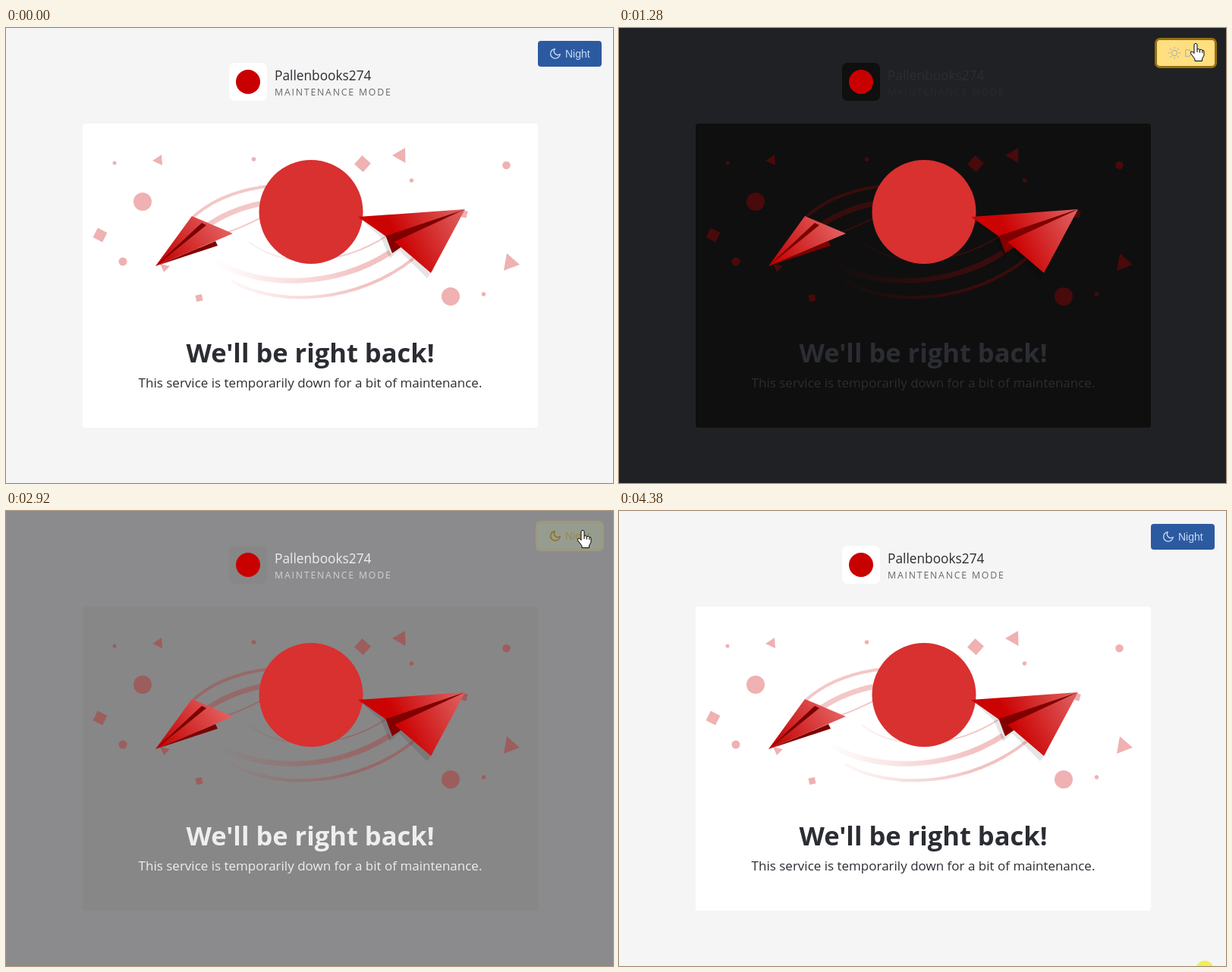
Recreate the animation shown at these times as an HTML page. Size 800x600 px, loop 4460 ms.

```html
<!DOCTYPE html>
<html lang="en">
<head>
<meta charset="utf-8">
<title>Maintenance mode</title>
<style>
html, body { margin: 0; width: 100%; height: 100%; overflow: hidden; background: var(--page); }
svg { display: block; width: 800px; height: 600px; }
text { font-family: "Open Sans", "Noto Sans", sans-serif; fill: var(--ink); }
.page { fill: var(--page); }
.card { fill: var(--card); }
.mid { text-anchor: middle; }
#bits { fill: #c00; opacity: .3; }
#trails { fill: none; stroke: #c00; }
#button text { font: 14px "Liberation Sans", Arial, sans-serif; fill: var(--label); }
#icons { fill: none; stroke: var(--icon); }
#cursor path { fill: #fff; stroke: #000; stroke-linejoin: round; }
</style>
</head>
<body>
<svg viewBox="0 0 800 600">
  <defs>
    <linearGradient id="wake" gradientUnits="userSpaceOnUse" x1="275" y1="0" x2="470" y2="0">
      <stop stop-color="#c00" stop-opacity="0"/><stop offset="1" stop-color="#c00" stop-opacity=".24"/>
    </linearGradient>
    <linearGradient id="left" gradientUnits="userSpaceOnUse" x1="205" y1="314" x2="285" y2="255">
      <stop stop-color="#c40000"/><stop offset="1" stop-color="#e46060"/>
    </linearGradient>
    <linearGradient id="right" gradientUnits="userSpaceOnUse" x1="520" y1="285" x2="606" y2="240">
      <stop stop-color="#cc0303"/><stop offset="1" stop-color="#e06464"/>
    </linearGradient>
  </defs>

  <rect class="page" width="800" height="600"/>
  <rect class="card" x="294" y="46" width="50" height="50" rx="7"/>
  <circle cx="319" cy="71" r="16" fill="#c90000"/>
  <text x="354" y="69" font-size="17.3">Pallenbooks274</text>
  <text x="354" y="89" font-size="12.3" font-weight="500" letter-spacing="1.8" opacity=".7">MAINTENANCE MODE</text>

  <rect class="card" x="101" y="126" width="600" height="401" rx="4"/>
  <g id="bits">
    <path d="M193 175L205 167L206 181ZM509 168L526 158L526.500 178ZM660 297L677 312L656 320ZM203 311L216 314L208 322Z"/>
  </g>
  <g id="trails">
    <g stroke-opacity=".22">
      <path d="M247 249C270 228 305 213 350 208" stroke-width="4"/>
      <path d="M266 260C290 244 318 233 352 229" stroke-width="7"/>
      <path d="M282 272C300 268 318 259 345 246" stroke-width="2"/>
    </g>
    <g stroke="url(#wake)">
      <path d="M278 308C335 344 435 343 506 296" stroke-width="7"/>
      <path d="M298 334C360 369 465 362 537 304" stroke-width="4"/>
      <path d="M320 282C365 317 440 314 502 274" stroke-width="2"/>
    </g>
  </g>
  <circle cx="402" cy="242.500" r="68.500" fill="#d93030"/>

  <path d="M197 314L276 281L279 287Z" fill="#7d0000"/>
  <path d="M197 314L245 248L299 271Z" fill="url(#left)"/>
  <path d="M197 314L258 257L264 260Z" fill="#7a0000"/>

  <path d="M465 250L494 276L506 304L518 293L555 330L564 318L520 280Z" opacity=".1"/>
  <path d="M500 273L509 297L522 288L540 262Z" fill="#850000"/>
  <path d="M605 239L464 249L501 275Z" fill="url(#right)"/>
  <path d="M605 239L560 323L511 281Z" fill="url(#right)"/>
  <path d="M605 239L501 274L512 282Z" fill="#800000"/>

  <text class="mid" x="401" y="441" font-size="34.500" font-weight="700">We'll be right back!</text>
  <text class="mid" x="401" y="474" font-size="17">This service is temporarily down for a bit of maintenance.</text>

  <g id="button">
    <rect id="ring" y="14" height="40" rx="7"/>
    <rect id="face" y="17" height="34" rx="4"/>
    <g id="icons">
      <path id="moon" transform="translate(715.500 25.500) scale(.7)" stroke-width="1.900" stroke-linejoin="round"
        d="M21 12.790A9 9 0 1 1 11.210 3A7 7 0 0 0 21 12.790Z"/>
      <g id="sun">
        <circle cx="732" cy="34" r="3.600" stroke-width="1.300"/>
        <circle cx="732" cy="34" r="6.900" stroke-width="2.200" pathLength="80" stroke-dasharray="2.500 7.500" stroke-dashoffset="1.250"/>
      </g>
    </g>
    <text id="word" y="39"></text>
  </g>

  <g id="cursor">
    <circle id="click" r="12" fill="#f0e800" opacity=".65"/>
    <path id="arrow" d="M.5 .5V16L4 12.700L6.500 18.500L9 17.400L6.500 11.700H11.500Z"/>
    <path id="hand" d="M-2 1.500Q0 -1 2 1.500V8Q4 7 5.500 8.500Q7.500 7.700 8.800 9.300Q11 9 11 11V16L8.500 21V23.500H-1V21L-6.500 13.500Q-7 10.500 -4.500 11L-2 13.500ZM2 8V12M5.500 8.500V12.500M8.800 9.300V13"/>
  </g>
</svg>
<script>
const LOOP = 4460, STEP = 75;
const $ = id => document.getElementById(id);
const set = (id, attrs) => { for (const k in attrs) $(id).setAttribute(k, attrs[k]); };
const show = (id, on) => set(id, { visibility: on ? 'visible' : 'hidden' });
const ramp = (t, a, b) => Math.min(1, Math.max(0, (t - a) / (b - a)));
const hold = (t, from) => from + STEP * Math.floor((t - from) / STEP);

const dots = [[143, 178, 2.5], [180, 229, 12], [154, 308, 5.5], [326.5, 173, 2.8],
  [534.5, 201, 2.7], [659.5, 181, 5.3], [586, 354, 12], [629.5, 351, 2.7]];
const squares = [[470, 179, 15.5, 42], [124, 273, 14, 27], [254.5, 356, 8.5, -12], [603, 245, 9.5, 15]];
$('bits').innerHTML += dots.map(([x, y, r]) => `<circle cx="${x}" cy="${y}" r="${r}"/>`).join('') +
  squares.map(([x, y, s, a]) =>
    `<rect x="${-s / 2}" y="${-s / 2}" width="${s}" height="${s}" transform="translate(${x} ${y}) rotate(${a})"/>`).join('');

// Pointer keys: time, x, y
const path = [[70, 724, 567], [595, 748, 216], [895, 760, 30], [970, 760, 20], [1749, 760, 20],
  [1750, 760, 21], [1819, 760, 21], [1820, 760, 22], [2369, 760, 22], [2370, 760, 24],
  [2449, 760, 24], [2450, 760, 25], [3925, 760, 25], [4300, 770, 560], [4375, 772, 605]];

function pointer(t) {
  const i = path.findIndex(k => k[0] > t);
  if (i < 1) return path[i < 0 ? path.length - 1 : 0].slice(1);
  const [a, b] = [path[i - 1], path[i]], p = ramp(t, a[0], b[0]);
  return [1, 2].map(n => Math.round(a[n] + (b[n] - a[n]) * p));
}

const rgb = hex => [1, 3, 5].map(i => parseInt(hex.slice(i, i + 2), 16));
function mix(day, night, p) {
  const n = rgb(night);
  return `rgb(${rgb(day).map((v, i) => Math.round(v + (n[i] - v) * p))})`;
}

function draw(t) {
  const h = hold(t, t < 2770 ? 1200 : 2770);
  const dark = (a, b, c, d) => ramp(h, a, b) - ramp(h, c, d);
  const back = dark(1125, 1266, 2845, 2995);
  const ink = dark(1275, 1500, 2995, 3520);
  const label = dark(1200, 1425, 2845, 3145);
  const colors = {
    page: mix('#f5f5f5', '#202124', back),
    card: mix('#ffffff', '#0f0f0f', back),
    ink: mix('#2b2d33', '#eeeeee', ink),
    label: mix('#c8dcf6', '#8f6b10', label),
    icon: mix('#c8dcf6', '#8f6b10', t < 2770 ? label : ink)
  };
  for (const k in colors) document.documentElement.style.setProperty('--' + k, colors[k]);

  const move = t < 1200 ? hold(t, 70) : t < 4000 ? t : hold(t, 4000);
  const [x, y] = pointer(move);
  const over = t >= 70 && y < 53, day = t >= 1200 && t < 2770;
  const left = day ? 709 : 701;
  set('face', { x: left, width: 785 - left, fill: mix('#2c5aa0', '#ffdf80', back) });
  set('ring', { x: left - 3, width: 791 - left, fill: mix('#a5c2ea', '#957010', back) });
  set('button', { transform: `translate(0 ${over ? -1 : 0})` });
  show('ring', t >= 1050 && t < 4375);
  show('moon', !day);
  show('sun', day);
  set('word', { x: day ? 745 : 737 });
  $('word').textContent = day ? 'Day' : 'Night';

  set('cursor', { transform: `translate(${x} ${y})` });
  show('arrow', t >= 70 && !over);
  show('hand', over);
  show('click', t >= 1050 && t < 1200 || t >= 4375);
}

const start = performance.now();
function frame() {
  draw((performance.now() - start) % LOOP);
  requestAnimationFrame(frame);
}
frame();
</script>
</body>
</html>
```
